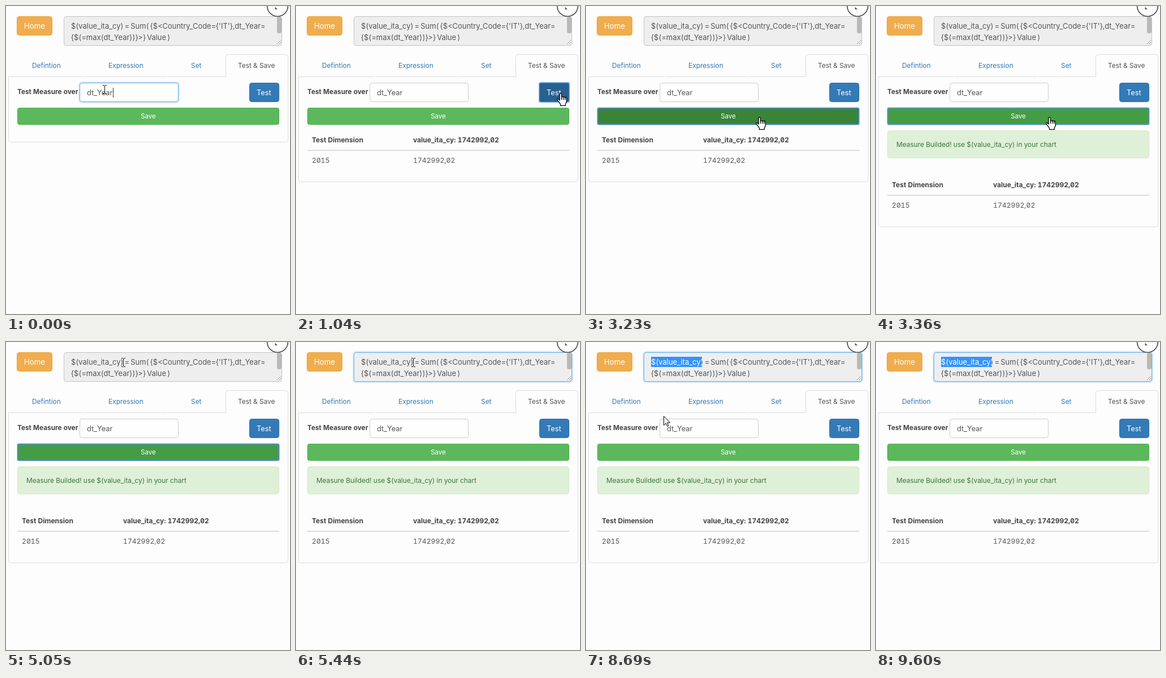
Recreate the animation shown at these times as an HTML page. Size 502 by 542 pixels, loop 9.72 s.

```html
<!DOCTYPE html>
<html lang="en">
<head>
<meta charset="utf-8">
<title>Measure test and save</title>
<style>
html, body { margin: 0; width: 100%; height: 100%; overflow: hidden; background: #fdfdfd; }
svg { display: block; font: 11.9px Inter, "Open Sans", sans-serif; font-feature-settings: "zero", "tnum", "calt" 0; fill: #555; }
text { white-space: pre; }
.mid { font-size: 12.8px; }
#formula { font-size: 12.95px; word-spacing: -1.3px; }
.bold { font-weight: 700; fill: #444; }
.link { fill: #337ab7; }
.light { fill: #fff; }
.line { fill: none; stroke: #ddd; }
.glow { fill: none; stroke: #66afe9; }
.ring { fill: none; stroke: #5794e0; stroke-width: 2; opacity: .8; }
.cursor { stroke: #000; fill: #fff; stroke-linejoin: round; }
</style>
</head>
<body>
<svg width="502" height="542" viewBox="0 0 502 542">
  <defs>
    <g id="formula">
      <text x="115" y="40">$(value_ita_cy) = Sum( {$&lt;Country_Code={'IT'},dt_Year=</text>
      <text x="115" y="60">{$(=max(dt_Year))}&gt;} Value )</text>
    </g>
    <clipPath id="picked"><rect id="pickedClip" y="26" height="18"/></clipPath>
  </defs>

  <rect x="19.5" y="18.5" width="62" height="33" rx="4" fill="#f0ad4e" stroke="#eea236"/>
  <text class="light" x="32" y="40" font-size="13.2">Home</text>

  <g id="areaGlow" class="glow">
    <rect x="102.5" y="18.5" width="385" height="51" rx="4" stroke-width="6" opacity=".14"/>
    <rect x="102.5" y="18.5" width="385" height="51" rx="4" stroke-width="3" opacity=".25"/>
  </g>
  <rect id="area" x="102.5" y="18.5" width="385" height="51" rx="4" fill="#eee"/>
  <rect x="479" y="19" width="8" height="29" rx="3" fill="#b9b9b9"/>
  <path d="M479 67l7-7M483 67l3-3" stroke="#666" stroke-dasharray="1.4"/>
  <use href="#formula"/>
  <rect id="selection" y="26" height="18" fill="#3393ff"/>
  <use href="#formula" class="light" clip-path="url(#picked)"/>

  <circle cx="480" cy="0" r="18.3" fill="#fdfdfd" stroke="#5a5a5a" stroke-width="1.8"/>
  <path d="M475.5 1.5V6H480Z" fill="#595959"/>

  <path class="line" d="M4 124.5H138M140 124.5H285M287 124.5H388.5V89.5q0-4 4-4H494.5q4 0 4 4V124.5"/>
  <path id="panel" class="line"/>
  <text class="link" x="46" y="109">Defintion</text>
  <text class="link" x="181" y="109">Expression</text>
  <text class="link" x="327" y="109">Set</text>
  <text x="410" y="109">Test &amp; Save</text>

  <text class="bold" x="20" y="155" font-size="11.8">Test Measure over</text>
  <g id="inputGlow" class="glow">
    <rect x="130.5" y="135.5" width="174" height="33" rx="4" stroke-width="6" opacity=".14"/>
    <rect x="130.5" y="135.5" width="174" height="33" rx="4" stroke-width="3" opacity=".25"/>
  </g>
  <rect id="input" x="130.5" y="135.5" width="174" height="33" rx="4" fill="#fefefe"/>
  <text class="mid" x="143" y="157">dt_Year</text>
  <path id="caret" d="M189.5 144V161" stroke="#333"/>

  <rect id="test" x="430.5" y="135.5" width="52" height="33" rx="4"/>
  <rect id="testRing" class="ring" x="430" y="135" width="53" height="34" rx="2"/>
  <text class="light mid" x="443" y="157">Test</text>

  <rect id="save" x="20.5" y="179.5" width="462" height="29" rx="3"/>
  <rect id="saveRing" class="ring" x="20.5" y="179.5" width="462" height="29" rx="2"/>
  <text class="light" x="251.5" y="198" font-size="11.5" text-anchor="middle">Save</text>

  <g id="alert">
    <rect x="20.5" y="219.5" width="462" height="48" rx="4" fill="#dff0d8" stroke="#d6e9c6"/>
    <text x="36" y="248" fill="#3c763d">Measure Builded! use $(value_ita_cy) in your chart</text>
  </g>
  <g id="table">
    <g class="bold" font-size="12">
      <text x="28" y="240">Test Dimension</text>
      <text x="207" y="240">value_ita_cy: 1742992,02</text>
    </g>
    <path class="line" stroke-width="2" d="M20 254H483"/>
    <g font-size="12.2">
      <text x="28" y="276">2015</text>
      <text x="207" y="276">1742992,02</text>
    </g>
  </g>

  <path id="arrow" class="cursor" d="M.5.5V16.5L4.2 13 6.7 18.5 9 17.5 6.6 12H11.5Z"/>
  <path id="hand" class="cursor" stroke-width="1.3" d="M5 13V2.5q0-1.7 1.7-1.7t1.7 1.7V8q.1-1.4 1.6-1.4t1.6 1.5q.2-1.2 1.5-1.2t1.5 1.5q.3-.9 1.3-.9t1.3 1.4v5.5q0 2-1 3.5t-1 2v2.5H6.5v-2.5q-1.5-1.7-2.7-4L1.2 13.2Q.2 11.5 1.2 10.7q1.2-.7 2.4.7ZM8.4 8v4M11.6 8v4M14.6 8.4v3.5"/>
  <path id="beam" fill="none" stroke="#111" d="M0 .5H2.5L3.5 1.5 4.5.5H7M3.5 1V15M0 15.5H2.5L3.5 14.5 4.5 15.5H7"/>
</svg>
<script>
const LOOP = 9720;
const $ = id => document.getElementById(id);
const show = (id, on) => $(id).setAttribute("visibility", on ? "visible" : "hidden");
const paint = (id, attrs) => {
  for (const name in attrs) $(id).setAttribute(name, attrs[name]);
};

// Pointer: start time, shape, left, top
const pointer = [
  [0, "beam", 171, 139], [390, "beam", 299, 153], [530, "arrow", 350, 171],
  [650, "arrow", 412, 171], [770, "hand", 455, 157], [890, "hand", 461, 153],
  [2700, "arrow", 377, 166], [2850, "hand", 338, 182], [2980, "hand", 312, 191],
  [3110, "hand", 300, 195], [4500, "hand", 299, 194], [4660, "arrow", 264, 114],
  [4800, "arrow", 236, 76], [4930, "beam", 210, 38], [5050, "beam", 204, 28],
  [5570, "beam", 165, 28], [5720, "beam", 146, 28], [5870, "beam", 122, 28],
  [5990, "beam", 108, 28], [6370, "arrow", 109, 36], [8690, "arrow", 137, 130],
  [8840, "arrow", 225, 262], [8970, "arrow", 310, 385], [9110, "arrow", 346, 421],
  [9240, "arrow", 384, 459], [9360, "arrow", 420, 497], [9480, "arrow", 445, 528],
  [9600, "none", 0, 0]
];
// Selection: start time, left edge
const selected = [[0, 205], [5570, 167], [5720, 152], [5870, 128], [5990, 115]];

const latest = (steps, t) => steps.findLast(step => step[0] <= t);

function draw(t) {
  const within = (from, to) => t >= from && t < to;
  const tested = t >= 1040, saved = t >= 3360, editing = t >= 5440;
  const bottom = saved ? 388.5 : tested ? 309.5 : 239.5;

  paint("panel", { d: `M4.5 124V${bottom - 4}q0 4 4 4H494.5q4 0 4-4V124` });
  show("table", tested);
  paint("table", { transform: `translate(0 ${saved ? 79 : 0})` });
  show("alert", saved);

  show("inputGlow", !tested);
  paint("input", { stroke: tested ? "#ccc" : "#66afe9" });
  show("caret", t < 390);
  show("areaGlow", editing);
  paint("area", { stroke: editing ? "#66afe9" : "#c4c4c4" });

  const testFocus = within(1040, 3230);
  const testHover = within(770, 2700);
  paint("test", {
    fill: testFocus || testHover ? "#286090" : "#337ab7",
    stroke: testHover ? "#204d74" : testFocus ? "#122b40" : "#2e6da4"
  });
  show("testRing", testFocus);

  const saveFocus = within(3230, 5440);
  const saveHover = within(2850, 4660);
  const pressed = within(3230, 3360);
  paint("save", {
    fill: pressed ? "#398439" : saveFocus || saveHover ? "#449d44" : "#5cb85c",
    stroke: pressed ? "#255625" : saveHover ? "#398439" : saveFocus ? "#255625" : "#4cae4c"
  });
  show("saveRing", saveFocus);

  const left = latest(selected, t)[1];
  for (const id of ["selection", "pickedClip"]) paint(id, { x: left, width: 205 - left });

  const [, shape, x, y] = latest(pointer, t);
  for (const id of ["arrow", "hand", "beam"]) {
    show(id, id === shape);
    paint(id, { transform: `translate(${x} ${y})` });
  }
}

const start = performance.now();
function tick() {
  draw((performance.now() - start) % LOOP);
  requestAnimationFrame(tick);
}
tick();
</script>
</body>
</html>
```
